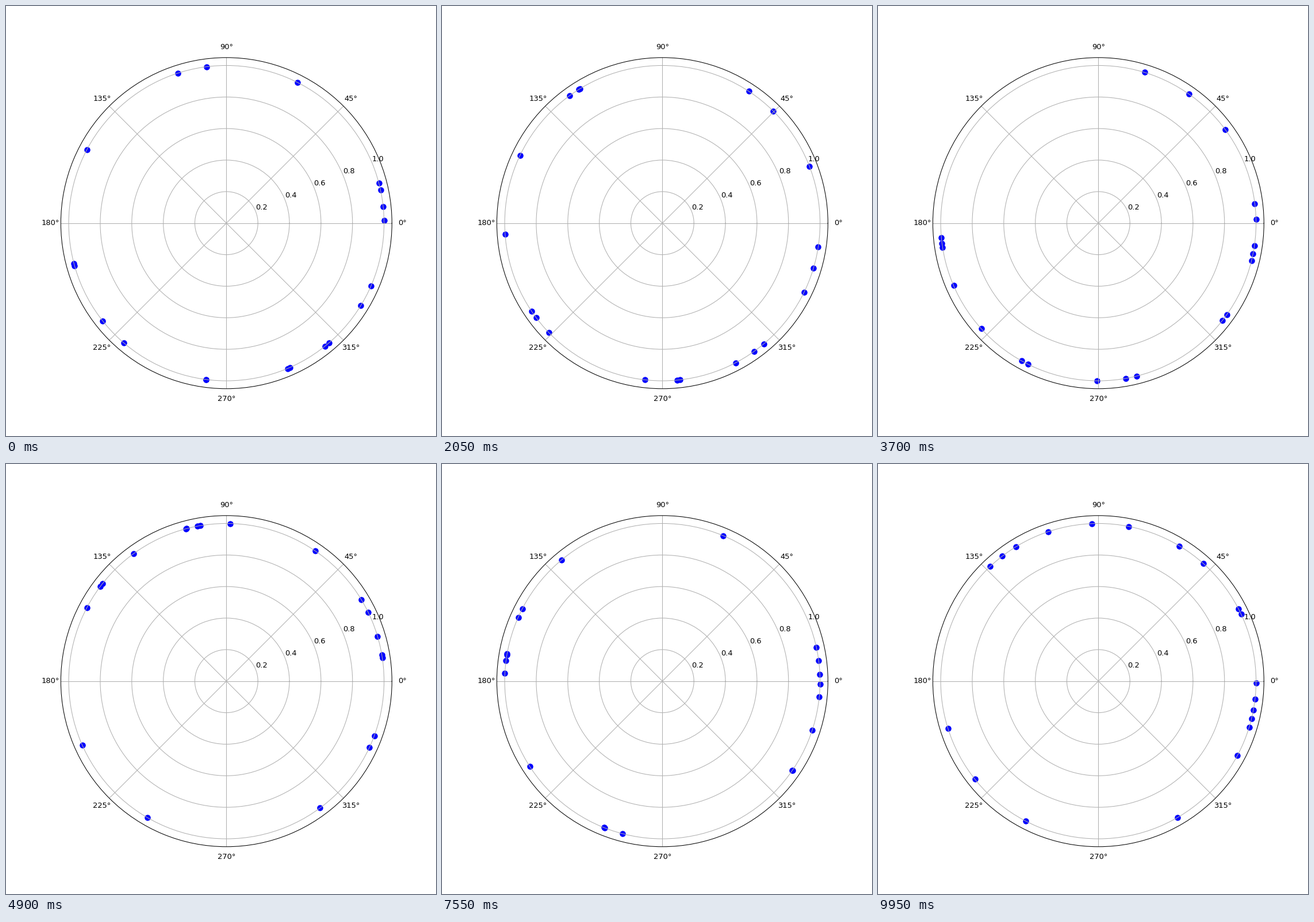
These frames come from a looping animation (748 by 748 pixels, 10000 ms). A matplotlib script:

```python
import numpy as np
import matplotlib.pyplot as plt
from matplotlib.animation import FuncAnimation

INCHES, DPI = 8, 93.5  # 748 x 748 px
FRAMES, INTERVAL = 200, 50
DOTS = 20


def positions(frame):
    """Polar coordinates of dots scattered at random on the unit circle."""
    theta = np.random.default_rng(frame).uniform(0, 2 * np.pi, DOTS)
    return np.column_stack([theta, np.ones(DOTS)])


fig, ax = plt.subplots(figsize=(INCHES, INCHES), dpi=DPI,
                       subplot_kw={"projection": "polar"})
dots = ax.scatter(*positions(0).T, s=50, color="blue")
ax.set_ylim(0, 1.05)
ax.set_yticks(np.linspace(0.2, 1, 5))


def update(frame):
    dots.set_offsets(positions(frame))
    return dots,


anim = FuncAnimation(fig, update, frames=FRAMES, interval=INTERVAL,
                     repeat=True, repeat_delay=0)
plt.show()
```
